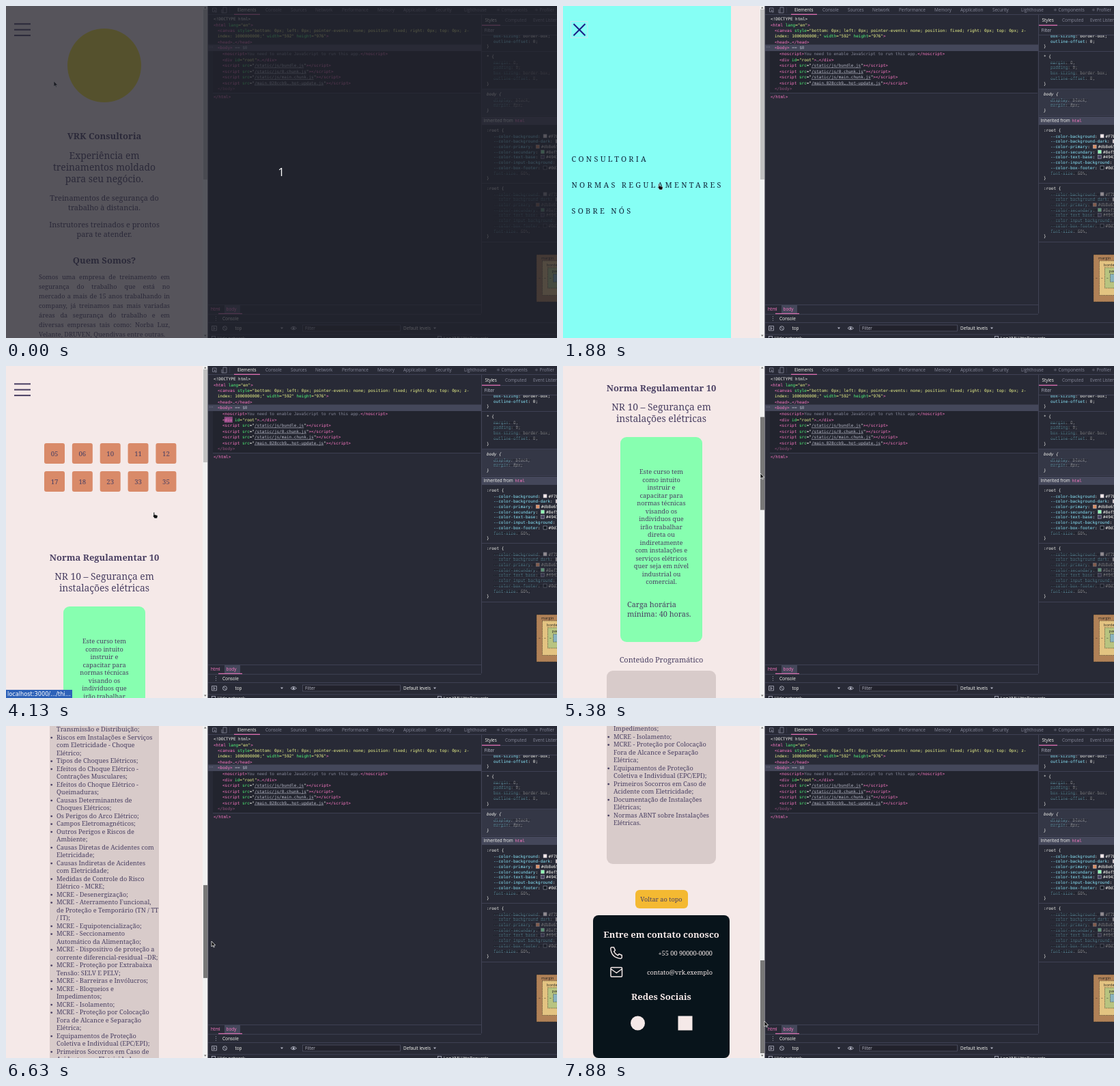
An HTML page that plays this animation: 807 by 486 pixels, repeating every 8000 ms.

```html
<!DOCTYPE html>
<html lang="pt">
<head>
<meta charset="utf-8">
<title>Consultoria</title>
<style>
html, body { margin: 0; width: 807px; height: 486px; overflow: hidden; background: #282a36 }
svg { display: block }
text { white-space: pre }
.serif { font-family: "Noto Serif", serif }
.ui { font-family: "Open Sans", "Noto Sans", sans-serif }
.mono { font-family: "DejaVu Sans Mono", monospace; font-size: 6px }
.about { font-size: 9.2px; line-height: 14px; color: #4a4063 }
.about div { white-space: nowrap; text-align: justify; text-align-last: justify }
.about div:last-child { text-align-last: left }
</style>
</head>
<body>
<svg id="stage" width="807" height="486" viewBox="0 0 807 486"></svg>
<script>
const INK = '#4a4063', PAPER = '#f5e9e8', LINE = '#44475a';
const C = { p: '#ff79c6', g: '#50fa7b', y: '#f1fa8c', w: '#f8f8f2', c: '#8be9fd', d: '#858799', l: '#b5b7c6' };

// Small builders; every y given to text is the visual middle of the line.
const esc = s => s.replace(/&/g, '&amp;').replace(/</g, '&lt;');
const text = (x, y, s, size, fill = INK, more = '') =>
  `<text x="${x}" y="${y + size * .34}" font-size="${size}" fill="${fill}" ${more}>${esc(s)}</text>`;
const mid = (y, s, size, fill = INK, more = '', x = 144) =>
  text(x, y, s, size, fill, 'text-anchor="middle" ' + more);
const bold = (y, s, fill) => mid(y, s, 13, fill, 'font-weight="700"');
const rect = (x, y, w, h, fill, r = 0, more = '') =>
  `<rect x="${x}" y="${y}" width="${w}" height="${h}" fill="${fill}" rx="${r}" ${more}/>`;
const path = (d, stroke, width = 1, fill = 'none') =>
  `<path d="${d}" stroke="${stroke}" stroke-width="${width}" fill="${fill}" stroke-linejoin="round"/>`;
const group = (id, body, cls = '') => `<g id="${id}" class="${cls}">${body}</g>`;
const lines = (y, step, list, draw) => list.map((s, i) => draw(y + i * step, s)).join('');

// code(x, y, colour key, string, colour key, string, ...); "u" is an underlined link
function code(x, y, ...parts) {
  let out = '';
  for (let i = 0; i < parts.length; i += 2) {
    const link = parts[i] === 'u';
    out += `<tspan fill="${link ? C.l : C[parts[i]]}"${link ? ' text-decoration="underline"' : ''}>${esc(parts[i + 1])}</tspan>`;
  }
  return `<text x="${x}" y="${y + 2.1}">${out}</text>`;
}

// ---------- site pages ----------
const home =
  `<circle cx="144" cy="87" r="54" fill="#f2df35"/>` +
  bold(190.5, 'VRK Consultoria') +
  lines(219, 17.25, ['Experiência em', 'treinamentos moldado', 'para seu negócio.'], (y, s) => mid(y, s, 13.85)) +
  lines(281, 13.8, ['Treinamentos de segurança do', 'trabalho à distancia.'], (y, s) => mid(y, s, 10.9)) +
  lines(320, 13.8, ['Instrutores treinados e prontos', 'para te atender.'], (y, s) => mid(y, s, 10.9)) +
  bold(372.5, 'Quem Somos?') +
  `<foreignObject x="48" y="390" width="192" height="100"><div class="about">` + [
    'Somos uma empresa de treinamento em',
    'segurança do trabalho que está no',
    'mercado a mais de 15 anos trabalhando in',
    'company, já treinamos nas mais variadas',
    'áreas da segurança do trabalho e em',
    'diversas empresas tais como: Norba Luz,',
    'Velante, DRUVEN, Quendivas entre outras.'
  ].map(s => `<div>${s}</div>`).join('') + `</div></foreignObject>`;

const tiles = ['05', '06', '10', '11', '12', '17', '18', '23', '33', '35'].map((n, i) => {
  const x = 56 + i % 5 * 40.85, y = i < 5 ? 113 : 154;
  return rect(x, y, 30, 30, '#d98a69', 3) + mid(y + 15.5, n, 9.6, INK, '', x + 15);
}).join('');

const norms = bold(281, 'Norma Regulamentares') +
  lines(305, 11.5, ['Clique em qualquer norma regulamentar', 'no cabeçalho para exibir seus detalhes:'],
    (y, s) => mid(y, s, 9.2));

const intro = `Este curso tem|como intuito|instruir e|capacitar para|normas técnicas|visando os|indivíduos que|irão trabalhar|direta ou|indiretamente|com instalações e|serviços elétricos|quer seja em nível|industrial ou|comercial.`.split('|');

// "*" opens a bullet
const topics = `*Introdução à Segurança|com Eletricidade;|*Normas e Regulamentos|do Setor Elétrico;|*Energia Elétrica: Geração,|Transmissão e Distribuição;|*Riscos em Instalações e Serviços|com Eletricidade - Choque|Elétrico;|*Tipos de Choques Elétricos;|*Efeitos do Choque Elétrico -|Contrações Musculares;|*Efeitos do Choque Elétrico -|Queimaduras;|*Causas Determinantes de|Choques Elétricos;|*Os Perigos do Arco Elétrico;|*Campos Eletromagnéticos;|*Outros Perigos e Riscos de|Ambiente;|*Causas Diretas de Acidentes com|Eletricidade;|*Causas Indiretas de Acidentes|com Eletricidade;|*Medidas de Controle do Risco|Elétrico - MCRE;|*MCRE - Desenergização;|*MCRE - Aterramento Funcional,|de Proteção e Temporário (TN / TT|/ IT);|*MCRE - Equipotencialização;|*MCRE - Seccionamento|Automático da Alimentação;|*MCRE - Dispositivo de proteção a|corrente diferencial-residual –DR;|*MCRE - Proteção por Extrabaixa|Tensão: SELV E PELV;|*MCRE - Barreiras e Invólucros;|*MCRE - Bloqueios e|Impedimentos;|*MCRE - Isolamento;|*MCRE - Proteção por Colocação|Fora de Alcance e Separação|Elétrica;|*Equipamentos de Proteção|Coletiva e Individual (EPC/EPI);|*Primeiros Socorros em Caso de|Acidente com Eletricidade;|*Documentação de Instalações|Elétricas;|*Normas ABNT sobre Instalações|Elétricas.`.split('|');

const topicLine = (y, s) => s[0] === '*'
  ? `<circle cx="66.7" cy="${y + .6}" r="1.4" fill="${INK}"/>` + text(74, y, s.slice(1), 9.2)
  : text(74, y, s, 9.2);

const footer = rect(44, 1480, 200, 209, '#08141b', 8) +
  bold(1509, 'Entre em contato conosco', PAPER) +
  `<g transform="translate(69 1526)">` +
  path('M2 1H5.5L7.5 5.5L5.5 7Q7.5 11 11.5 12.8L13 10.8L17.2 12.5V16Q17 17.5 15 17.4Q2 16 .8 3Q.8 1.2 2 1Z', PAPER, 1.5) + `</g>` +
  path('M71 1556.500H85.500Q86.500 1556.500 86.500 1558V1568.500Q86.500 1570 85.500 1570H71Q70 1570 70 1568.500V1558Q70 1556.500 71 1556.500M70 1558.500L78.300 1564.500L86.500 1558.500', PAPER, 1.5) +
  text(219, 1536, '+55 00 90000-0000', 9.2, PAPER, 'text-anchor="end"') +
  text(219, 1563.5, 'contato@vrk.exemplo', 9.2, PAPER, 'text-anchor="end"') +
  bold(1600, 'Redes Sociais', PAPER) +
  `<circle cx="109.500" cy="1638" r="10.500" fill="${PAPER}"/>` + rect(168.5, 1627.5, 21, 21, PAPER);

const course = bold(281, 'Norma Regulamentar 10') +
  lines(308, 17.25, ['NR 10 – Segurança em', 'instalações elétricas'], (y, s) => mid(y, s, 13.85)) +
  rect(84, 352, 120, 300, '#87ffb0', 9) +
  lines(403, 11.5, intro, (y, s) => mid(y, s, 9.2)) +
  lines(597, 13.8, ['Carga horária', 'mínima: 40 horas.'], (y, s) => text(94, y, s, 10.9)) +
  mid(678, 'Conteúdo Programático', 10.9) +
  rect(64, 694, 160, 711, '#d8cbca', 9) + lines(758.5, 11.5, topics, topicLine) +
  rect(106, 1443, 77, 27, '#f4b932', 6) + mid(1457, 'Voltar ao topo', 9.2) + footer;

const menu = rect(0, 0, 246, 486, '#86fff5') +
  lines(224, 38, ['CONSULTORIA', 'NORMAS REGULAMENTARES', 'SOBRE NÓS'],
    (y, s) => text(12.5, y, s, 10.9, '#10263a', 'letter-spacing="3.3" font-weight="500"'));

// ---------- developer tools ----------
function tools() {
  const ui = (x, y, s, fill = C.d, size = 6.4) => text(x, y, s, size, fill);
  const row = (y, w = 511, x = 296) => rect(x, y, w, .8, LINE);
  const script = (y, src) => code(317, y, 'p', '<script ', 'g', 'src', 'w', '="', 'u', src, 'w', '"', 'p', '></' + 'script>');

  const tabs = [[339, 'Elements'], [380, 'Console'], [417, 'Sources'], [453, 'Network'], [492, 'Performance'], [544, 'Memory'],
    [582, 'Application'], [629, 'Security'], [671, 'Lighthouse'], [718, '⚛ Components'], [774, '⚛ Profiler']];
  const chrome = rect(296, 0, 511, 486, '#282a36') + rect(295.3, 0, .9, 486, '#4b4d5c') +
    path('M308 8V3H302.500V8.500H305M305 5.500L308.500 9L306 9Z', C.d, .8) +
    path('M318 2H323V10H318ZM316 5V10H318', C.d, .8) + rect(327.5, 2, .6, 8, LINE) +
    tabs.map(([x, s], i) => ui(x, 6.3, s, i ? C.d : C.w)).join('') +
    row(12) + rect(334, 11.7, 38, 1.1, C.p) +
    rect(303, 66, 392, 61, '#22242e') + row(127, 392, 303) +
    rect(296, 56.5, 400, 9.5, LINE) + ui(297, 60, '⋯', C.l) +
    rect(320, 438, 23, 12, LINE) + rect(311, 449.8, 35, 1.2, C.p) + row(437, 400) + row(450.8, 400) +
    ui(300, 443.5, 'html', C.p) + ui(322.5, 443.5, 'body', C.p) +
    ui(303.5, 457, '⋮', C.l, 8) + ui(317, 457.5, 'Console', C.w) + row(463) +
    path('M301.500 468.500H308.500V475H301.500ZM304 470L306.500 471.800L304 473.500Z', C.l, .8) +
    `<circle cx="320.500" cy="471.700" r="3" fill="none" stroke="${C.l}" stroke-width=".9"/>` + path('M318.400 469.600L322.600 473.800', C.l, .8) +
    ui(335.5, 471.5, 'top', C.w) + path('M402 470.500H406L404 473Z', 'none', 0, C.l) +
    path('M417 471.700Q421 467 425.500 471.700Q421 476 417 471.700Z', C.l, .9) + `<circle cx="421.200" cy="471.700" r="1.500" fill="${C.l}"/>` +
    rect(434.5, 467, 143, 9, '#22222c', 0, `stroke="#55586b" stroke-width=".7"`) + ui(438, 471.7, 'Filter', C.l) +
    ui(582, 471.5, 'Default levels', C.w) + path('M626 470.500H630L628 473Z', 'none', 0, C.l) + row(480.5) +
    rect(301.5, 483.5, 5, 5, 'none', 0, `stroke="${C.l}" stroke-width=".8"`) + ui(310, 486.5, 'Hide network', C.w) +
    rect(632.5, 483.5, 5, 5, 'none', 0, `stroke="${C.l}" stroke-width=".8"`) + ui(641, 486.5, 'Log XMLHttpRequests', C.w);

  const tree = group('flash', rect(319.8, 74.3, 12, 8.6, '#8a4a80')) +
    code(304, 19, 'w', '<!DOCTYPE html>') +
    code(304, 27.5, 'p', '<html ', 'g', 'lang', 'y', '="en"', 'p', '>') +
    code(310, 36, 'p', '<canvas ', 'g', 'style', 'y', '="bottom: 0px; left: 0px; pointer-events: none; position: fixed; right: 0px; top: 0px; z-') +
    code(310, 44, 'y', 'index: 1000000000;" ', 'g', 'width', 'y', '="592" ', 'g', 'height', 'y', '="976"', 'p', '>') +
    code(310, 52.5, 'p', '<head>', 'd', '…', 'p', '</head>') +
    code(310, 61, 'p', '<body>', 'l', ' == $0') +
    code(317, 70, 'p', '<noscript>', 'd', 'You need to enable JavaScript to run this app.', 'p', '</noscript>') +
    code(317, 78.5, 'p', '<div ', 'g', 'id', 'y', '="root"', 'p', '>', 'd', '…', 'p', '</div>') +
    lines(87, 8.5, ['/static/js/bundle.js', '/static/js/0.chunk.js', '/static/js/main.chunk.js', '/main.828ccb9….hot-update.js'], script) +
    `<g opacity=".5">${code(310, 121, 'p', '</body>')}</g>` + code(304, 133, 'p', '</html>');

  const rule = (y, name, list, off) => code(704, y, 'w', name + ' {') +
    `<g ${off ? 'opacity=".55" text-decoration="line-through"' : ''}>` +
    lines(y + 8.5, 7.7, list, (v, s) => {
      const [key, value] = s.split(':');
      return code(714, v, 'c', key, 'w', ':' + value);
    }) + `</g>` + code(704, y + 8.7 + list.length * 7.7, 'w', '}');
  const vars = [['background', '#F7E9E8'], ['background-dark', '#d8cbca'], ['primary', '#db8e65'], ['secundary', '#8ef5b0'],
    ['text-base', '#494360'], ['input-background', '#ffffff'], ['box-footer', '#0d141b']];
  const root = (y, off) => code(704, y, 'w', ':root {') + vars.map(([n, v], i) => {
    const key = `--color-${n}`, ry = y + 8.5 + i * 7.7, x = 714 + (key.length + 2) * 3.612 + .8;
    return `<g ${off ? 'opacity=".5" text-decoration="line-through"' : ''}>` + code(714, ry, 'c', key, 'w', ': ') +
      rect(x, ry - 2.6, 5, 5, v, 0, `stroke="${C.l}" stroke-width=".5"`) + code(x + 7.5, ry, 'w', v + ';') + `</g>`;
  }).join('') +
    `<g opacity=".55" text-decoration="line-through">${code(714, y + 62.4, 'c', 'font-size', 'w', ': 60%;')}</g>` +
    code(704, y + 70.3, 'w', '}');
  const sep = y => row(y, 110, 697);
  const back = rect(696, 13, .9, 437, LINE) + rect(697, 122, 110, 38, '#343746') + rect(697, 162, 110, 12, LINE) +
    [66, 121, 160, 259, 345].map(sep).join('');
  const styles = code(714, 44, 'c', 'box-sizing', 'w', ': border-box;') + code(714, 51.5, 'c', 'outline-offset', 'w', ': 0;') + code(704, 59, 'w', '}') +
    rule(74, '*', ['margin: 0;', 'padding: 0;', 'box-sizing: border-box;', 'outline-offset: 0;'], true) +
    `<g font-style="italic">${rule(129, 'body', ['display: block;', 'margin: 8px;'], true)}</g>` +
    code(745.5, 168, 'p', 'html') + root(182) + root(267, true);
  const head = rect(697, 13, 110, 29.5, '#282a36') + ui(701.5, 21, 'Styles', C.w) + ui(731, 21, 'Computed') + ui(772, 21, 'Event Listeners') +
    sep(28) + rect(697, 27.6, 27, 1.1, C.p) + ui(700.5, 36, 'Filter', C.l) + sep(42) + ui(699.5, 168, 'Inherited from', C.w);
  const edge = 'stroke="#3a3328" stroke-width=".6" stroke-dasharray="1.5 1"';
  const box = rect(777, 364, 80, 69, '#b08157', 0, edge) + rect(785.5, 373, 64, 50.5, '#e3c381', 0, edge) +
    rect(793.5, 383, 48, 30, '#b8c480', 0, edge) + rect(801.5, 392.5, 30, 11.5, '#88b2bd', 0, edge) +
    ui(784, 368.7, 'margin', '#222', 5.6) + ui(792, 379, 'border', '#222', 5.6) + ui(799.5, 388, 'padding', '#222', 5.6) +
    ['–', '–', '–'].map((s, i) => ui(780 + i * 8, 398, s, '#222', 5.6)).join('');
  return `<g class="ui">${chrome}${back}</g><g class="mono">${tree}${styles}</g><g class="ui">${head}${box}</g>`;
}

// ---------- stage ----------
const arrow = path('M0 0V8L1.900 6.300L3.100 9L4.300 8.500L3.200 5.900H5.700Z', '#fff', .7, '#111');
const hand = path('M0 .500Q1-.500 1.600.500V3.500L5.500 4.500Q6.300 5 6 6.500L5.300 9H1.500L-.800 5.800Q-.800 4.600 0 5Z', '#fff', .5, '#111');
const stage = document.getElementById('stage');
stage.innerHTML = rect(0, 0, 296, 486, PAPER) +
  `<g class="serif">` + group('home', home) + group('scroll', group('tiles', tiles) + group('norms', norms) + group('course', course)) +
  group('menu', menu) + `</g>` +
  group('burger', rect(11.5, 22.5, 24.5, 24, 'none', 0, 'id="focus" stroke="#d5dcec" stroke-width=".8"') +
    [0, 1, 2].map(i => rect(-12, -1, 24, 2, INK, 0, `id="bar${i}"`)).join('')) +
  group('bar', rect(288, 0, 7.5, 486, '#f1f1f1') + path('M290 3.500H293.600L291.800 1.200Z', 'none', 0, '#666') +
    path('M290 481.500H293.600L291.800 483.800Z', 'none', 0, '#666') + rect(289, 5, 6, 136, '#c1c1c1', 0, 'id="thumb"')) +
  group('status', rect(0, 474, 97, 12, '#2e62b8') +
    text(2, 480, 'localhost:3000/…/thi…', 8.2, '#fff', 'font-family="DejaVu Sans, sans-serif"')) +
  tools() + group('cursor', group('arrow', arrow) + group('hand', hand)) +
  group('overlay', rect(0, 0, 807, 486, '#20212b', 0, 'opacity=".74"') + mid(243.500, '1', 17, '#fff', '', 403), 'ui');

const $ = id => document.getElementById(id);
const set = (id, name, value) => $(id).setAttribute(name, value);
const show = (id, on) => set(id, 'visibility', on ? 'visible' : 'hidden');

function track(keys, t) {
  let i = 1;
  while (i < keys.length - 1 && keys[i][0] < t) i++;
  const a = keys[i - 1], b = keys[i];
  const k = Math.min(1, Math.max(0, (t - a[0]) / (b[0] - a[0])));
  return a.slice(1).map((v, n) => v + (b[n + 1] - v) * k);
}
const pointer = [[250, 70, 110], [750, 24, 32], [1250, 24, 32], [1750, 140, 260], [1875, 140, 260], [2625, 193, 216], [3250, 152, 128],
  [3500, 152, 128], [4125, 216, 214], [4875, 291, 88], [5000, 291, 88], [5375, 289, 157], [6625, 301, 315], [7875, 295, 432]];
const scrolling = [[5000, 0], [5250, 140], [5375, 248], [6625, 811], [7875, 1203]];
const ease = t => 1 - (1 - Math.min(1, Math.max(0, t))) ** 2.24;

function draw(now) {
  const t = Math.floor(now % 8000 / 125) * 125;
  const blank = t === 2125 || t === 3750;
  const first = t < 2125, chosen = t > 3750;
  const [x, y] = track(pointer, t), [top] = track(scrolling, t);
  const open = ease((t - 1005) / 300) - ease((t - 1880) / 300);

  show('home', first);
  show('tiles', !first && !blank);
  show('norms', !first && !chosen && !blank);
  show('course', chosen);
  set('scroll', 'transform', `translate(0 ${-top})`);

  show('menu', open > 0);
  set('menu', 'transform', `translate(${246 * (open - 1)} 0)`);
  show('burger', !blank);
  set('burger', 'transform', `translate(0 ${-top})`);
  show('focus', t >= 1000 && t < 2125);
  [-1, 0, 1].forEach((side, i) => {
    set('bar' + i, 'transform', `translate(24 ${34.7 + side * 8.4 * (1 - open)}) rotate(${-side * 45 * open})`);
    set('bar' + i, 'fill', open > .1 ? '#1b1b84' : INK);
  });
  set('bar1', 'opacity', 1 - open);

  show('bar', !blank);
  set('thumb', 'y', 5 + top * .281);
  set('thumb', 'height', first ? 249 : 136);
  set('thumb', 'fill', t >= 5000 ? '#787878' : '#c1c1c1');
  show('status', t >= 3125 && t < 4500);
  show('flash', t >= 2125 && t < 2875 || t >= 3750 && t < 4625);

  const pointing = t >= 625 && t < 2125 || t >= 3125 && t < 4375;
  set('cursor', 'transform', `translate(${x} ${y})`);
  show('arrow', !pointing);
  show('hand', pointing);
  set('overlay', 'opacity', t < 250 ? 1 : t < 375 ? .5 : 0);
}

const start = performance.now();
function loop() {
  draw(performance.now() - start);
  requestAnimationFrame(loop);
}
loop();
</script>
</body>
</html>
```
